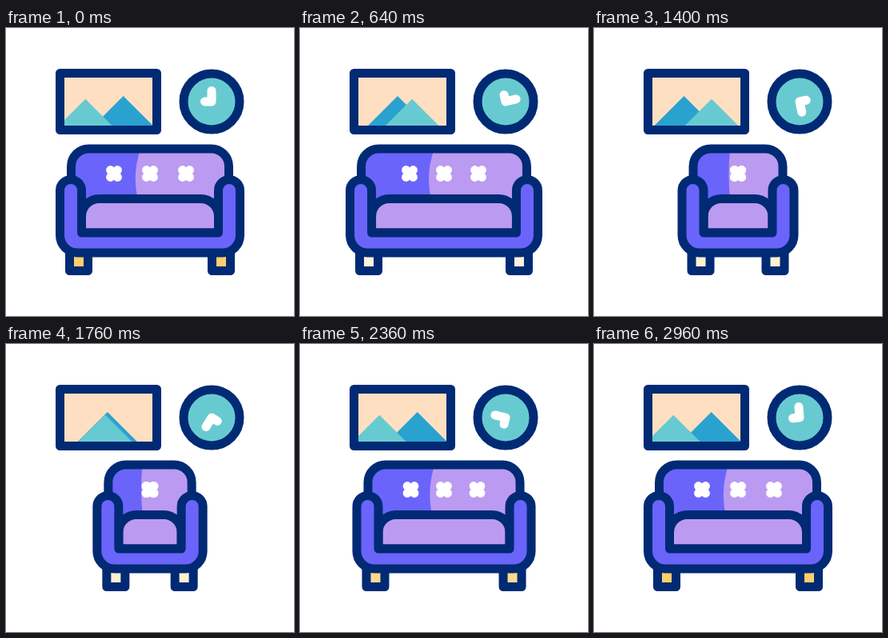
Write an HTML page with a canvas that moves like this. It is 360 by 360 pixels and loops after 3 s.

```html
<!DOCTYPE html>
<html lang="en">
<head>
<meta charset="utf-8">
<title>Living room</title>
<style>
html, body { margin: 0; width: 100%; height: 100%; overflow: hidden; background: #fff; }
canvas { display: block; width: 360px; height: 360px; }
</style>
</head>
<body>
<canvas id="stage"></canvas>
<script>
const LOOP = 3000, CX = 180, LINE = 11;
const NAVY = '#012a74', VIOLET = '#6a64fb', LILAC = '#bb9af1', TEAL = '#68cad1',
      BLUE = '#2aa2d0', CREAM = '#ffdfc1', YELLOW = '#ffcf6c', WHITE = '#fff';

const canvas = document.getElementById('stage');
const ctx = canvas.getContext('2d');
const dpr = window.devicePixelRatio || 1;
canvas.width = canvas.height = 360 * dpr;
ctx.scale(dpr, dpr);
ctx.lineJoin = ctx.lineCap = 'round';

// Half the sofa's width: it stretches before shrinking and squeezes before growing.
const WIDTH = [[0, 118], [200, 123.2], [420, 126], [560, 124.7], [640, 123], [760, 109],
  [1040, 83], [1240, 79], [1400, 75.5], [1660, 71.5], [1830, 71.9], [1920, 74],
  [2040, 88], [2360, 114.5], [2540, 118], [3000, 118]];
const FOOT_TINT = [[0, 1], [520, 1], [680, 0], [1300, 0], [1400, 0.3], [2040, 0.3], [2360, 0.75], [2500, 1], [3000, 1]];

const mix = (a, b, k) => a + (b - a) * k;
const ease = u => u <= 0 ? 0 : u >= 1 ? 1 : u < 0.5 ? 4 * u ** 3 : 1 - 4 * (1 - u) ** 3;

// 0 -> 1 -> 0 within one loop
const swing = (t, out, outTime, back, backTime) =>
  ease((t - out) / outTime) - ease((t - back) / backTime);

function segment(keys, t) {
  let i = 0;
  while (i < keys.length - 2 && t > keys[i + 1][0]) i++;
  return i;
}

function linear(keys, t) {
  const i = segment(keys, t), [t0, a] = keys[i], [t1, b] = keys[i + 1];
  return mix(a, b, (t - t0) / (t1 - t0));
}

function smooth(keys, t) {
  const i = segment(keys, t), [t0, a] = keys[i], [t1, b] = keys[i + 1];
  const slope = j => {
    if (j <= 0 || j >= keys.length - 1) return 0;
    const l = (keys[j][1] - keys[j - 1][1]) / (keys[j][0] - keys[j - 1][0]);
    const r = (keys[j + 1][1] - keys[j][1]) / (keys[j + 1][0] - keys[j][0]);
    return l * r <= 0 ? 0 : 2 * l * r / (l + r);
  };
  const d = t1 - t0, u = (t - t0) / d, u2 = u * u, u3 = u2 * u;
  return a * (2 * u3 - 3 * u2 + 1) + b * (3 * u2 - 2 * u3)
    + d * (slope(i) * (u3 - 2 * u2 + u) + slope(i + 1) * (u3 - u2));
}

function paint(path, fill, stroke) {
  if (fill) { ctx.fillStyle = fill; ctx.fill(path); }
  if (stroke) { ctx.strokeStyle = stroke; ctx.lineWidth = LINE; ctx.stroke(path); }
}

function box(x0, y0, x1, y1, radii = 0) {
  const p = new Path2D();
  p.roundRect(x0, y0, x1 - x0, y1 - y0, radii);
  return p;
}

function disc(x, y, r) {
  const p = new Path2D();
  p.arc(x, y, r, 0, Math.PI * 2);
  return p;
}

function mountain(x, top, color) {
  const base = 124, h = base - top;
  paint(new Path2D(`M${x - h} ${base}L${x} ${top}L${x + h} ${base}Z`), color);
}

function drawPicture(t) {
  const frame = box(67.5, 56.5, 188.5, 127.5);
  paint(frame, CREAM);
  ctx.save();
  ctx.clip(frame);
  mountain(mix(146.7, 112, swing(t, 0, 1097, 1240, 1097)), 85, BLUE);
  mountain(mix(99.3, 147.3, swing(t, 0, 962, 1285, 962)), 88.7, TEAL);
  ctx.restore();
  paint(frame, null, NAVY);
}

function drawClock(t) {
  paint(disc(257, 92, 35), TEAL, NAVY);
  ctx.save();
  ctx.translate(257, 92);
  ctx.rotate(t / LOOP * Math.PI * 2);
  paint(new Path2D('M0 -13.5V0H-8.5'), null, WHITE);
  ctx.restore();
}

function drawFeet(w, tint) {
  for (const side of [-1, 1]) {
    const x = CX + side * (w - 29);
    const foot = box(x - 11.5, 278, x + 11.5, 303.5);
    paint(foot, WHITE);
    ctx.globalAlpha = tint;
    paint(foot, YELLOW);
    ctx.globalAlpha = 1;
    paint(foot, null, NAVY);
  }
}

function drawBack(w) {
  const half = w - 19.5;
  const back = box(CX - half, 151, CX + half, 240, [22, 22, 0, 0]);
  paint(back, VIOLET);
  ctx.save();
  ctx.clip(back);
  const top = CX - 6 - w * 0.05, mid = CX - w * 0.153, low = CX - w * 0.132;
  const bend = 2 * mid - (top + low) / 2;
  paint(new Path2D(`M${top} 151Q${bend} 182 ${low} 213V240H330V151Z`), LILAC);
  ctx.restore();
  paint(back, null, NAVY);
}

function drawButtons(gap) {
  for (const x of [CX - gap, CX, CX + gap]) {
    for (const dx of [-4.4, 4.4])
      for (const dy of [-4.4, 4.4]) paint(disc(x + dx, 182 + dy, 5.5), WHITE);
    paint(disc(x, 182, 5), WHITE);
  }
}

function drawSeat(w) {
  const inner = w - 32.5, outer = w - 5.5;
  const l = CX - outer, li = CX - inner, ri = CX + inner, r = CX + outer;
  const cushion = box(li, 213.5, ri, 256, [22, 22, 0, 0]);
  const body = new Path2D(
    `M${l} 203A13.5 13.5 0 0 1 ${li} 203V256H${ri}V203A13.5 13.5 0 0 1 ${r} 203` +
    `V259A22 22 0 0 1 ${r - 22} 281H${l + 22}A22 22 0 0 1 ${l} 259Z`);
  paint(cushion, LILAC, NAVY);
  paint(body, VIOLET, NAVY);
}

function draw(t) {
  const w = smooth(WIDTH, t);
  ctx.fillStyle = WHITE;
  ctx.fillRect(0, 0, 360, 360);
  drawPicture(t);
  drawClock(t);
  drawFeet(w, linear(FOOT_TINT, t));
  drawBack(w);
  drawButtons(45 * (1 - swing(t, 438, 911, 1600, 1042)));
  drawSeat(w);
}

const start = performance.now();
function tick() {
  draw((performance.now() - start) % LOOP);
  requestAnimationFrame(tick);
}
tick();
</script>
</body>
</html>
```
